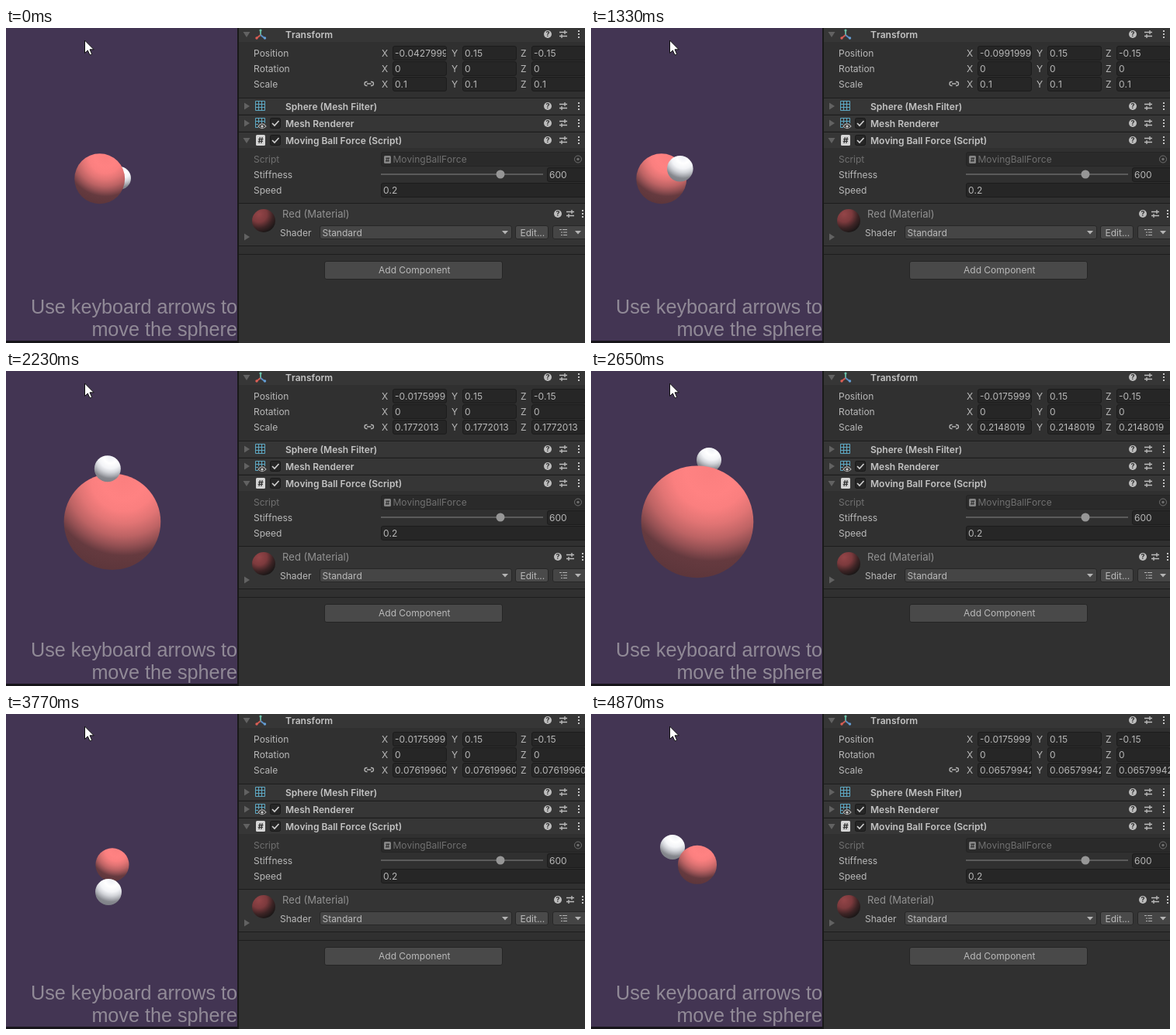
These frames come from a looping animation (746 by 407 pixels, 4940 ms). An HTML page:

```html
<!DOCTYPE html>
<html lang="en">
<head>
<meta charset="utf-8">
<title>Moving ball</title>
<style>
html, body { margin: 0; width: 100%; height: 100%; overflow: hidden; background: #303030; }
svg { display: block; }
text { font-family: Inter, Roboto, sans-serif; font-size: 12px; font-kerning: none; fill: #b9b9b9; }
.bold { font-weight: 600; fill: #c4c4c4; }
.dim { fill: #707070; }
.note { font-family: "Liberation Sans", Arial, sans-serif; font-size: 25.2px; fill: #918a97; text-anchor: end; }
</style>
</head>
<body>
<svg id="stage" width="746" height="407" viewBox="0 0 746 407">
  <defs>
    <radialGradient id="red" cx=".62" cy=".05" r="1">
      <stop offset="0" stop-color="#fb7f7f"/><stop offset=".22" stop-color="#ff8282"/>
      <stop offset=".34" stop-color="#fa7f7f"/><stop offset=".47" stop-color="#e17474"/>
      <stop offset=".6" stop-color="#bd6364"/><stop offset=".7" stop-color="#945053"/>
      <stop offset=".8" stop-color="#653a3f"/><stop offset="1" stop-color="#5b353a"/>
    </radialGradient>
    <radialGradient id="white" cx=".62" cy=".05" r="1">
      <stop offset="0" stop-color="#eef0f6"/><stop offset=".25" stop-color="#ffffff"/>
      <stop offset=".45" stop-color="#f3f4f7"/><stop offset=".6" stop-color="#d2d4d9"/>
      <stop offset=".72" stop-color="#abadb3"/><stop offset=".82" stop-color="#86888e"/>
      <stop offset="1" stop-color="#7c7e85"/>
    </radialGradient>
    <radialGradient id="matte" cx=".3" cy=".22" r=".85">
      <stop offset="0" stop-color="#944548"/><stop offset=".4" stop-color="#7c3a3d"/>
      <stop offset=".7" stop-color="#3d2425"/><stop offset="1" stop-color="#171515"/>
    </radialGradient>
  </defs>
  <rect width="300" height="407" fill="#433553"/>
  <g id="balls">
    <circle id="big" fill="url(#red)"/>
    <circle id="small" fill="url(#white)"/>
  </g>
  <text class="note" x="298" y="369">Use keyboard arrows to</text>
  <text class="note" x="298" y="398">move the sphere</text>
  <rect y="404" width="300" height="3" fill="#17151a"/>
  <path d="M101.500 16v16.500l3.800-3.600 2.700 6 2.700-1.200-2.700-5.900h5.200z" fill="#fff" stroke="#111" stroke-width="1"/>
  <g id="panel"></g>
</svg>
<script>
const $ = id => document.getElementById(id);

// ---- inspector ----
const text = (x, y, s, cls = "", size = 12) =>
  `<text x="${x}" y="${y}" class="${cls}" style="font-size:${size}px">${s}</text>`;
const box = (x, y, w, h, fill, stroke = "none", rx = 0) =>
  `<rect x="${x}" y="${y}" width="${w}" height="${h}" rx="${rx}" fill="${fill}" stroke="${stroke}"/>`;
const path = (d, stroke = "#b9b9b9", w = 1, fill = "none") =>
  `<path d="${d}" stroke="${stroke}" stroke-width="${w}" fill="${fill}"/>`;
const dot = (x, y, r, fill, stroke = "none") =>
  `<circle cx="${x}" cy="${y}" r="${r}" fill="${fill}" stroke="${stroke}"/>`;
const rule = y => box(300, y, 446, 1, "#1d1d1d");

const field = (x, y, w, value, id = "") =>
  box(x + .5, y + .5, w - 1, 18, "#262626", "#1c1c1c", 2.5) +
  `<svg x="${x + 1}" y="${y}" width="${w - 2}" height="19"><text id="${id}" x="2" y="14">${value}</text></svg>`;

const fold = (y, open) => path(open
  ? `M305.500 ${y - 3}h9l-4.500 7z` : `M307 ${y - 4.5}v9l7-4.500z`, "none", 0, "#626262");

const tools = (y, x = 698, gap = 20) => {
  const a = x + gap, b = x + 2 * gap;
  return dot(x, y, 5, "#bdbdbd") +
    `<text x="${x}" y="${y + 3.2}" text-anchor="middle" style="font-size:9px;font-weight:700;fill:#303030">?</text>` +
    path(`M${a - 5} ${y - 2.5}h10M${a - 5} ${y + 2.5}h10M${a + 2} ${y - 5}v5M${a - 2} ${y}v5`, "#bdbdbd", 1.3) +
    [-4, 0, 4].map(d => box(b - 1, y + d - 1, 2, 2, "#c4c4c4")).join("");
};

const check = y => box(340.5, y - 6.5, 13, 13, "#262626", "#191919", 2) +
  path(`M343 ${y}l3 3 5.500-6`, "#d0d0d0", 1.6);

const grid = y => path(`M321.500 ${y - 6.5}h12v12h-12zM325.500 ${y - 6.5}v12M329.500 ${y - 6.5}v12` +
  `M321.500 ${y - 2.5}h12M321.500 ${y + 1.5}h12`, "#5ea9c4");

const page = (x, y, w, h, size) => box(x, y, w, h, size > 9 ? "#d5d5d5" : "#858585", "none", 1.5) +
  `<text x="${x + w / 2}" y="${y + h / 2 + size * .36}" text-anchor="middle" style="font-size:${size}px;font-weight:700;fill:#303030">#</text>`;

const arrow = (x, y) => path(`M${x - 4} ${y - 2}h8l-4 4.500z`, "none", 0, "#b4b4b4");

function header(y, title, open, icon, checked) {
  return box(300, y - 10, 446, 20, "#363636") + fold(y, open) + icon +
    (checked ? check(y) : "") + text(360, y + 4.5, title, "bold") + tools(y);
}

function vector(name, y, values, ids) {
  return text(319, y + 4, name) + values.map((v, i) => {
    const x = [498, 588, 677][i];
    return text(x - 14, y + 4, "XYZ"[i]) + field(x, y - 10, 70, v, ids[i]);
  }).join("");
}

const axes = path("M328 9V2.500", "#5fae9b", 2) + path("M328 9l-5 4", "#cf5a50", 2) +
  path("M328 9l5 4", "#5b8fc4", 2) + dot(328, 3, 1.6, "#6cc0a8") +
  dot(323, 13, 1.7, "#dc5f55") + dot(333.5, 13, 1.7, "#659ed4");
const eye = box(325, 123, 11, 8, "#363636") +
  path("M325 127q5-6.500 10 0q-5 5.500-10 0z", "#bdbdbd", 1.1) + dot(330, 127, 1.6, "#d0d0d0");
const link = path("M465.500 69.500h-1a2.500 2.500 0 0 0 0 5h1M470 69.500h1a2.500 2.500 0 0 1 0 5h-1M465 72h5.500", "#b4b4b4", 1.3);

$("panel").innerHTML =
  box(298, 0, 2, 407, "#191919") + box(300, 0, 446, 407, "#303030") +
  header(8, "Transform", true, axes) +
  vector("Position", 33, ["", "0.15", "-0.15"], ["px", "", ""]) +
  vector("Rotation", 53, [0, 0, 0], ["", "", ""]) +
  vector("Scale", 73, ["", "", ""], ["s0", "s1", "s2"]) + link +
  header(101, "Sphere (Mesh Filter)", false, grid(101)) +
  header(123, "Mesh Renderer", false, grid(123) + eye, true) +
  header(145, "Moving Ball Force (Script)", true, page(322, 138, 12, 14, 11), true) +
  rule(90) + rule(112) + rule(134) +
  text(319, 174, "Script", "dim") +
  box(483.5, 160.5, 270, 18, "#2a2a2a", "#242424", 2.5) + page(487, 165, 9, 10, 8) +
  text(498.5, 174, "MovingBallForce", "dim") +
  dot(737, 169.5, 4.5, "none", "#707070") + dot(737, 169.5, 1.7, "#707070") +
  text(319, 194, "Stiffness") + box(483, 188, 209, 2, "#5b5b5b") + dot(637, 189, 5.5, "#969696") +
  field(697, 180, 58, "600") +
  text(319, 214, "Speed") + field(483, 200, 270, "0.2") +
  rule(226) + box(300, 227, 446, 54, "#343434") + rule(281) + rule(292) +
  dot(332, 249, 15, "url(#matte)") + fold(270, false) +
  `<g opacity=".7">${text(356, 245, "Red (Material)", "", 13)}</g>` + tools(240, 711, 16) +
  text(353, 269, "Shader") +
  box(404.5, 255.5, 247, 17, "#454545", "#272727", 2.5) + text(407.5, 268.5, "Standard") + arrow(643, 264) +
  box(656.5, 255.5, 42, 17, "#4a4a4a", "#272727", 2.5) + text(662.5, 268.5, "Edit...") +
  box(704.5, 255.5, 48, 17, "#454545", "#272727", 2.5) +
  path("M713 260.500h3M717 260.500h6M715 264h2M718 264h5M715 267.500h2M718 267.500h5", "#b4b4b4", 1.2) + arrow(737, 264) +
  box(410.5, 301.5, 229, 23, "#494949", "#252525", 2.5) + text(480, 317, "Add Component");

// ---- motion ----
const LOOP = 4940, STEP = LOOP / 71, LAG = 50;

const posKeys = [[70, -.0428], [494, -.1276], [1130, -.1276], [1680, -.0176]];
const sizeKeys = [[1790.7, .1], [2364.7, .2148], [2680, .2148], [2731, .225], [2931, .225],
  [3220.3, .1672], [3707.3, .0762], [3762, .0658], [3830, .0658], [3890, .0775]];
// time, x, y, radius
const ballKeys = [
  [0, 146, 194, 15], [150, 146, 206, 15], [320, 137, 227, 16], [520, 117, 214, 16.5],
  [696, 109, 200, 16.5], [1120, 111, 197, 16.5], [1450, 117, 172, 17], [1879, 119, 157, 17.5],
  [2230, 131, 126, 17], [2440, 145, 117, 16.3], [2644, 152, 115, 16], [2860, 152, 112, 16],
  [3080, 147, 125, 17], [3270, 142, 137.3, 17.5], [3500, 139, 180, 18], [3757, 132, 230, 17],
  [3970, 142, 226, 16.8], [4160, 168, 196, 16], [4350, 156, 163, 15.8], [4520, 142, 160, 15.8],
  [4700, 118, 163, 16], [4870, 105, 172, 16]];
const behind = [[0, 300], [2400, 3120], [4260, LOOP]];

function linear(keys, t) {
  const i = keys.findIndex(k => k[0] > t);
  if (i === 0) return keys[0][1];
  if (i < 0) return keys[keys.length - 1][1];
  const [a, b] = [keys[i - 1], keys[i]];
  return a[1] + (b[1] - a[1]) * (t - a[0]) / (b[0] - a[0]);
}

function smooth(keys, t, c) {
  const last = keys.length - 1;
  if (t >= keys[last][0]) return keys[last][c];
  const i = keys.findIndex(k => k[0] > t) - 1;
  const a = keys[i], b = keys[i + 1], h = b[0] - a[0], u = (t - a[0]) / h;
  const slope = j => {
    const p = keys[Math.max(j - 1, 0)], n = keys[Math.min(j + 1, last)];
    return (n[c] - p[c]) / (n[0] - p[0]) * h;
  };
  const v = 1 - u;
  return v * v * (1 + 2 * u) * a[c] + u * v * v * slope(i) +
    u * u * (3 - 2 * u) * b[c] - u * u * v * slope(i + 1);
}

// rounded values with the float drift that the editor prints
const round4 = v => Math.round(v * 1e4) / 1e4;

function posText(v) {
  const r = round4(-v);
  return "-" + (r < .1 ? (r - 1e-7).toFixed(7) : (r + 1e-6).toFixed(6));
}

function sizeText(v) {
  const r = round4(v);
  return r === .1 ? "0.1" : (r + (r - .1) * 1.69e-5).toFixed(r < .1 ? 8 : 7);
}

function circle(id, x, y, r) {
  const e = $(id);
  e.setAttribute("cx", x);
  e.setAttribute("cy", y);
  e.setAttribute("r", r);
}

function draw(t) {
  const half = linear(sizeKeys, t) / 2;
  circle("big", 148.3 + 645 * linear(posKeys, t), 194.8, 643 * half / Math.sqrt(1 - (half / .36) ** 2));
  circle("small", ...[1, 2, 3].map(c => smooth(ballKeys, t, c)));
  const back = behind.some(([a, b]) => t >= a && t < b);
  $("balls").append(back ? $("big") : $("small"));

  $("px").textContent = posText(linear(posKeys, t - LAG));
  const size = sizeText(linear(sizeKeys, Math.min(t - LAG, 3800)));
  for (const id of ["s0", "s1", "s2"]) $(id).textContent = size;
}

const start = performance.now();
function tick() {
  const t = (performance.now() - start) % LOOP;
  draw(Math.min(Math.floor((t + 4) / STEP), 70) * STEP);
  requestAnimationFrame(tick);
}
tick();
</script>
</body>
</html>
```
